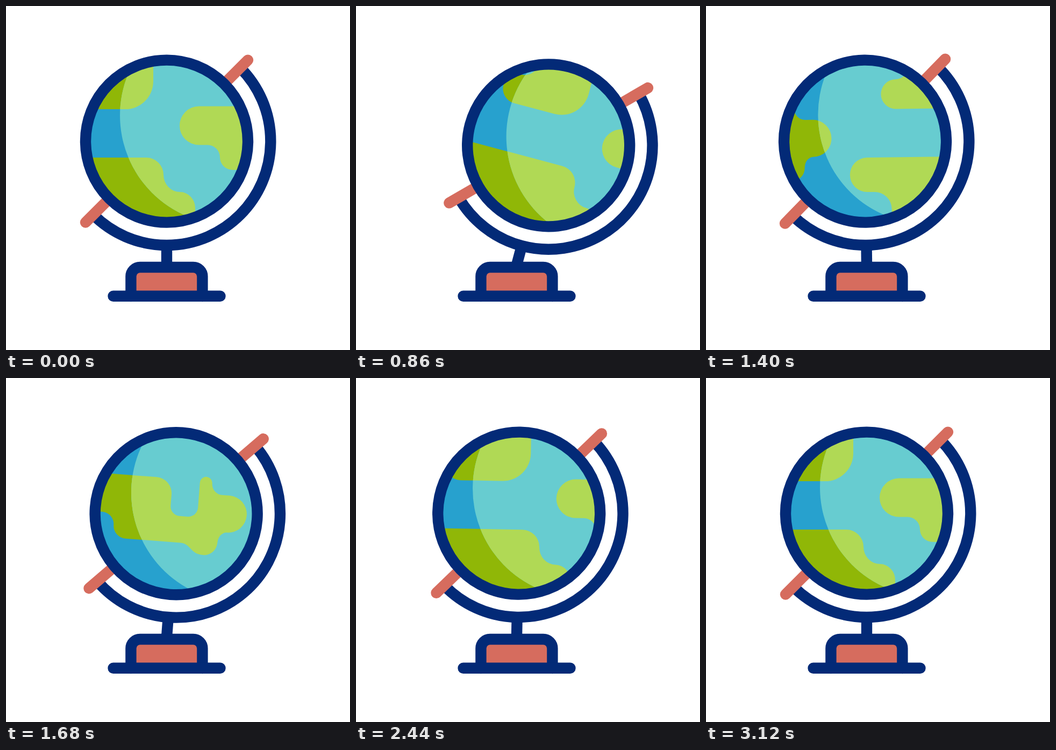
Recreate the animation shown at these times as an HTML page. Size 640 by 640 pixels, loop 3.28 s.

```html
<!DOCTYPE html>
<html lang="en">
<head>
<meta charset="utf-8">
<title>Desk globe</title>
<style>
  html, body { margin: 0; width: 100%; height: 100%; overflow: hidden; background: #fff; }
  svg { display: block; width: 100%; height: 100%; }
</style>
</head>
<body>
<svg viewBox="0 0 640 640">
  <defs>
    <clipPath id="ball"><circle r="146"/></clipPath>
    <clipPath id="lit"><circle cx="116" cy="-48" r="203"/></clipPath>
    <g id="land">
      <path d="M-25-170V-111.5A52 52 0 0 1-77-59.5H-155a27.5 27.5 0 0 1 0-55a25 25 0 0 0 25-25V-170Z"/>
      <path d="M-210 30.5H-38a32 32 0 0 1 32 32a31 32 0 0 0 31 32a28 30 0 0 1 28 30V170H-165V126.5a32 32 0 0 0-32-32H-210a32 32 0 0 1 0-64Z"/>
      <path d="M60-65H172a30 30 0 0 1 30 30V-14a18 18 0 0 0 18 18H235a18 18 0 0 0 18-18V-61a11.5 11.5 0 0 1 23 0a20 20 0 0 0 20 20H310a34.5 34.5 0 0 1 0 69a16 20 0 0 0-16 20a25 25 0 0 1-25 25C245 73 245 53.5 225 53.5H123a24 23.5 0 0 1-24-23.5a23 23 0 0 0-23-23H60a36 36 0 0 1 0-72Z"/>
    </g>
    <g id="map">
      <use href="#land"/>
      <use href="#land" id="wrap"/>
    </g>
  </defs>

  <g id="swing" fill="none" stroke="#032a77" stroke-width="20.4">
    <path d="M299 445V486"/>
    <g transform="translate(299 251.6)">
      <path d="M136.7-136.7A193.3 193.3 0 0 1-136.7 136.7"/>
      <path d="M-151 151L151-151" stroke="#d66c5e" stroke-linecap="round"/>
      <g clip-path="url(#ball)" stroke="none">
        <circle r="146" fill="#27a1ce"/>
        <use href="#map" class="map" fill="#90b707"/>
        <g clip-path="url(#lit)">
          <circle r="146" fill="#67ccd0"/>
          <use href="#map" class="map" fill="#b0d955"/>
        </g>
      </g>
      <circle r="151"/>
    </g>
  </g>

  <g stroke="#032a77" stroke-width="20.4" stroke-linecap="round">
    <path d="M232.4 540V503a17 17 0 0 1 17-17h99a17 17 0 0 1 17 17V540" fill="#d66c5e"/>
    <path d="M199.5 539.8H398.5"/>
  </g>
</svg>
<script>
  const LOOP = 3280, STEP = 20, MAP_WIDTH = 620;
  const PIVOT = "299 481.5";

  // Keys are [ms, value].
  const tilt = [[220, 0], [490, -6], [600, -6.2], [900, 16], [1268, -7.2], [1550, 7.1],
                [1935, -3.1], [2320, 3.1], [2600, -2.1], [2910, 0]];
  const turn = 2 * MAP_WIDTH;
  const spin = [[220, 0], [490, -25], [600, -26], [860, 72.6], [1400, MAP_WIDTH + 213],
                [2000, turn - 66], [2440, turn + 45], [2580, turn + 50], [3120, turn]];

  const rate = (a, b) => (b[1] - a[1]) / (b[0] - a[0]);

  // Flat at the ends and turning points, harmonic mean elsewhere.
  function slope(keys, i) {
    if (i === 0 || i === keys.length - 1) return 0;
    const a = rate(keys[i - 1], keys[i]), b = rate(keys[i], keys[i + 1]);
    return a * b > 0 ? 2 * a * b / (a + b) : 0;
  }

  function valueAt(keys, t) {
    const last = keys.length - 1;
    if (t <= keys[0][0]) return keys[0][1];
    if (t >= keys[last][0]) return keys[last][1];
    const i = keys.findIndex(k => k[0] > t) - 1;
    const [t0, v0] = keys[i], [t1, v1] = keys[i + 1];
    const d = t1 - t0, x = (t - t0) / d, y = 1 - x;
    return v0 * y * y * (1 + 2 * x) + v1 * x * x * (1 + 2 * y)
         + d * x * y * (slope(keys, i) * y - slope(keys, i + 1) * x);
  }

  const swing = document.getElementById("swing");
  const maps = document.querySelectorAll(".map");
  document.getElementById("wrap").setAttribute("x", -MAP_WIDTH);

  function draw(t) {
    swing.setAttribute("transform", `rotate(${valueAt(tilt, t)} ${PIVOT})`);
    const offset = (valueAt(spin, t) + MAP_WIDTH) % MAP_WIDTH;
    for (const map of maps) map.setAttribute("x", offset);
  }

  const start = performance.now();
  function frame() {
    const t = (performance.now() - start) % LOOP;
    draw(Math.floor(t / STEP) * STEP);
    requestAnimationFrame(frame);
  }
  draw(0);
  requestAnimationFrame(frame);
</script>
</body>
</html>
```
